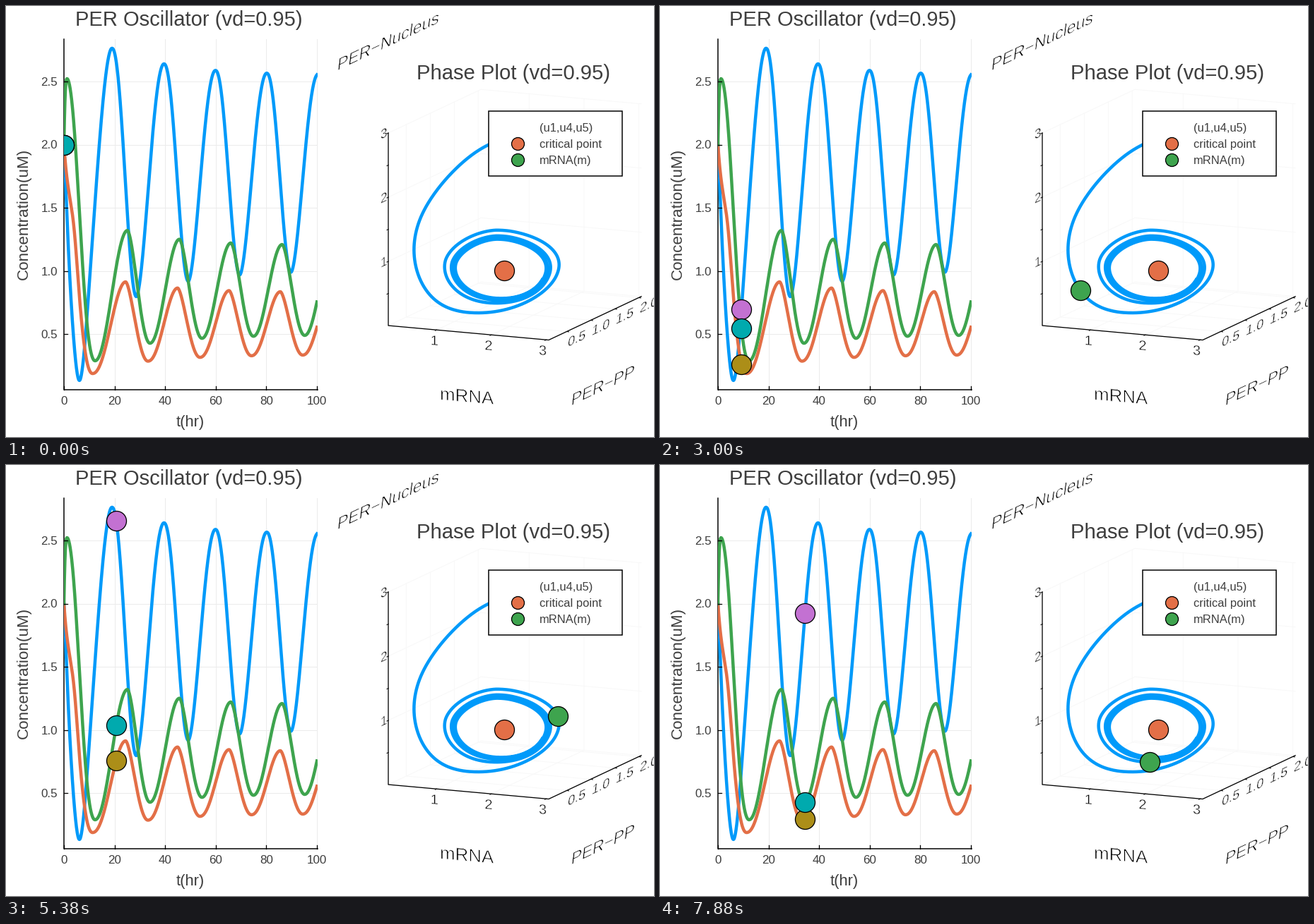
Write a matplotlib script that moves like this. It is 917 px wide and 611 px high and loops after 8000 ms.

```python
import numpy as np
import matplotlib.pyplot as plt
from matplotlib.animation import FuncAnimation
from matplotlib.patches import PathPatch, Rectangle
from matplotlib.textpath import TextPath
from matplotlib.transforms import Affine2D

W, H, DPI = 917, 611, 100
PX = 72 / DPI
FRAMES, STEP_MS = 64, 125
BLUE, ORANGE, GREEN = "#009afa", "#e36f47", "#3ea44e"
PURPLE, GOLD, TEAL = "#c371d2", "#ac8e18", "#00aaae"
INK, FONT = "#3e3e3e", "Liberation Sans"

fig = plt.figure(figsize=(W / DPI, H / DPI), dpi=DPI, facecolor="white")
ax = fig.add_axes([0, 0, 1, 1])
ax.set_xlim(0, W)
ax.set_ylim(H, 0)
ax.axis("off")


# ---------- signals ----------
def spline(t, v, x, first, last=0):
    """Cubic spline through (t, v) with given end slopes."""
    t, v = np.array(t, float), np.array(v, float)
    h = np.diff(t)
    d = np.diff(v) / h
    a, r = np.eye(len(t)), np.zeros(len(t))
    r[0], r[-1] = first, last
    for i in range(1, len(t) - 1):
        a[i, i - 1:i + 2] = h[i], 2 * (h[i - 1] + h[i]), h[i - 1]
        r[i] = 3 * (h[i] * d[i - 1] + h[i - 1] * d[i])
    m = np.linalg.solve(a, r)
    k = np.clip(np.searchsorted(t, x, side="right") - 1, 0, len(h) - 1)
    u = (x - t[k]) / h[k]
    return (v[k] * (1 + 2 * u) * (1 - u) ** 2 + h[k] * m[k] * u * (1 - u) ** 2
            + v[k + 1] * u ** 2 * (3 - 2 * u) + h[k] * m[k + 1] * u ** 2 * (u - 1))


def extremes(t, v, extra):
    """Peaks or troughs that settle geometrically onto the limit cycle."""
    k = np.arange(5)
    fade = .42 ** k
    return list(zip(t + 20.2 * k - .6 * fade, v + extra * fade))


def signal(start, slope, peaks, troughs, up, down):
    """A splined transient, then skewed cosine swings between extremes."""
    split = start[-1][0]
    turns = sorted(start[-1:] + [p for p in extremes(*peaks) + extremes(*troughs)
                                 if p[0] > split + 1])
    t, v = np.array(turns).T

    def value(x):
        x = np.asarray(x, float)
        k = np.clip(np.searchsorted(t, x, side="right") - 1, 0, len(t) - 2)
        u = np.clip((x - t[k]) / (t[k + 1] - t[k]), 0, 1)
        u = u ** np.where(v[k + 1] > v[k], up, down)
        late = v[k] + (v[k + 1] - v[k]) * (1 - np.cos(np.pi * u)) / 2
        early = spline(*zip(*start), np.minimum(x, split), slope)
        return np.where(x < split, early, late)
    return value


mrna = signal([(0, 2), (2, 1.075), (4.05, .41), (6.1, .132), (9.36, .71),
               (14.25, 2.07), (19, 2.763)], -.475,
              (19.6, 2.55, .213), (29.2, 1.005, -.209), .88, 1.085)
per_pp = signal([(0, 2), (1.25, 1.725), (4.05, 1.325), (6.1, .8), (9.36, .257),
                 (11.3, .187)], -.3,
                (25, .829, .084), (33.8, .337, -.052), 1.09, .82)
nucleus = signal([(0, 2), (1.25, 2.522), (4.05, 2.13), (6.1, 1.47), (9.36, .533),
                  (12.3, .288)], 1.2,
                 (25.7, 1.2, .12), (34.6, .494, -.067), 1.03, .85)


def solver_time(i):
    """Simulated hours after i adaptive steps, keyed at every seventh step."""
    hours = [0, .55, 3.45, 7.8, 10.95, 14.25, 19.8, 25.7, 30.2, 34.4]
    return spline(7 * np.arange(len(hours)), hours, i, .03, .55)


def plot_xy(t, v):
    return 82 + 3.58 * np.asarray(t), 554.5 - 179 * np.asarray(v)


def project(m, p, n):
    return 523.2 + 77.6 * m + 67.9 * p, 456.2 + 7 * m - 32 * p - 91 * n


# ---------- drawing helpers ----------
def line(xs, ys, color="black", width=1.3, z=2):
    return ax.plot(xs, ys, color=color, lw=width * PX, zorder=z)[0]


def disc(x, y, color, r=14, z=5):
    return ax.plot([x], [y], "o", ms=2 * r * PX, mfc=color, mec="black",
                   mew=1.3 * PX, zorder=z)[0]


def label(x, y, s, size, ha="center", z=3, **kw):
    kw = {"va": "baseline", **kw}
    ax.text(x, y, s, fontsize=size * PX, family=FONT, color=INK, ha=ha, zorder=z, **kw)


ALONG_M = (.996, .088)
ALONG_P = (.904, -.428)


def slanted(x, y, s, size, along, lean=0.0, thin=.8):
    """Thin lettering laid along a projected axis."""
    path = TextPath((0, 0), s.replace("-", "\u2212"), size=size, prop={"family": FONT})
    plane = Affine2D.from_values(*along, lean, -.97, x, y)
    ax.add_patch(PathPatch(path, transform=plane + ax.transData, fc="black",
                           ec="white", lw=thin * PX, zorder=1))


# ---------- time plot ----------
def draw_time_plot(clip):
    for t in range(0, 101, 20):
        x, _ = plot_xy(t, 0)
        if t:
            line([x, x], [47, 544], "#ebebeb", 1, 0)
        line([x, x], [544, 539], z=4)
        label(x, 565, str(t), 17)
    for v in np.arange(.5, 2.6, .5):
        _, y = plot_xy(0, v)
        line([82, 440], [y, y], "#ebebeb", 1, 0)
        line([82, 87], [y, y], z=4)
        label(73, y + 6, f"{v:.1f}", 17, "right")
    line([82, 82, 440.5], [47, 544, 544], width=1.5, z=1)
    t = np.linspace(0, 100, 1600)
    for f, color in ((mrna, BLUE), (per_pp, ORANGE), (nucleus, GREEN)):
        line(*plot_xy(t, f(t)), color, 4.5, 3).set_clip_path(clip)
    label(259, 27.5, "PER Oscillator (vd=0.95)", 29.1)
    label(261, 596, "t(hr)", 22)
    label(25.5, 295, "Concentration(uM)", 22.4, rotation=90, va="center")


# ---------- phase plot ----------
def draw_phase_plot():
    m0, m1, p0, p1, n0, n1 = .12, 3.045, .125, 2.055, 0, 3

    def path(*pts, **kw):
        line(*zip(*(project(*p) for p in pts)), **kw)

    faint = dict(color="#f8f8f8", width=1, z=0)
    for m in (1, 2, 3):
        path((m, p0, n0), (m, p1, n0), (m, p1, n1), **faint)
    for p in (.5, 1, 1.5, 2):
        path((m1, p, n0), (m0, p, n0), (m0, p, n1), **faint)
    for n in (0, 1, 2, 3):
        path((m0, p0, n), (m0, p1, n), (m1, p1, n), **faint)
    path((m0, p0, n1), (m0, p0, n0), (m1, p0, n0), (m1, p1, n0))

    for k in range(1, 7):
        x, y = project(m0, p0, k / 2)
        line([x - 2, x], [y + 1, y], width=1)
    for k in (1, 2, 3):
        _, y = project(m0, p0, k)
        slanted(530, y + 9, str(k), 19, ALONG_P, thin=.5)
        x, y = project(k, p0, 0)
        line([x, x - 2], [y, y + 1], width=1)
        slanted(x - 7.5 - k, y + 21, str(k), 20, ALONG_M, thin=.5)
    for k in range(1, 5):
        x, y = project(m1, k / 2, 0)
        line([x, x + 3], [y, y + .4], width=1)
        slanted(x + 1, y + 22, f"{k / 2:.1f}", 20, ALONG_P, .12, .5)

    slanted(614, 558, "mRNA", 26, ALONG_M)
    slanted(799, 567, "PER-PP", 25, ALONG_P, .12)
    slanted(468, 92, "PER-Nucleus", 25.5, ALONG_P, .12)

    t = np.linspace(0, 100, 2400)
    line(*project(mrna(t), per_pp(t), nucleus(t)), BLUE, 4.5, 3)
    disc(*project(1.85, .57, .833), ORANGE)
    label(718, 104, "Phase Plot (vd=0.95)", 29.2)

    ax.add_patch(Rectangle((682.5, 148.5), 189, 92, fc="white", ec="black",
                           lw=1.5 * PX, zorder=8))
    for row, s in enumerate(("(u1,u4,u5)", "critical point", "mRNA(m)")):
        y = 171.5 + 23 * row
        label(755, y + 6.5, s, 16.5, "left", 9)
        if row:
            disc(724, y, (ORANGE, GREEN)[row - 1], 9, 9)


area = Rectangle((82, 46), 358.5, 498, transform=ax.transData)
draw_time_plot(area)
draw_phase_plot()

dots = [(mrna, disc(0, 0, PURPLE, z=5)), (per_pp, disc(0, 0, GOLD, z=6)),
        (nucleus, disc(0, 0, TEAL, z=7))]
for _, dot in dots:
    dot.set_clip_path(area)
orbit = disc(0, 0, GREEN, z=6)


def update(i):
    t = solver_time(i)
    for f, dot in dots:
        x, y = plot_xy(t, f(t))
        dot.set_data([x], [y])
    x, y = project(mrna(t), per_pp(t), nucleus(t))
    orbit.set_data([x], [y])
    return [d for _, d in dots] + [orbit]


anim = FuncAnimation(fig, update, frames=FRAMES, interval=STEP_MS,
                     repeat=True, repeat_delay=0, blit=False)
plt.show()
```
